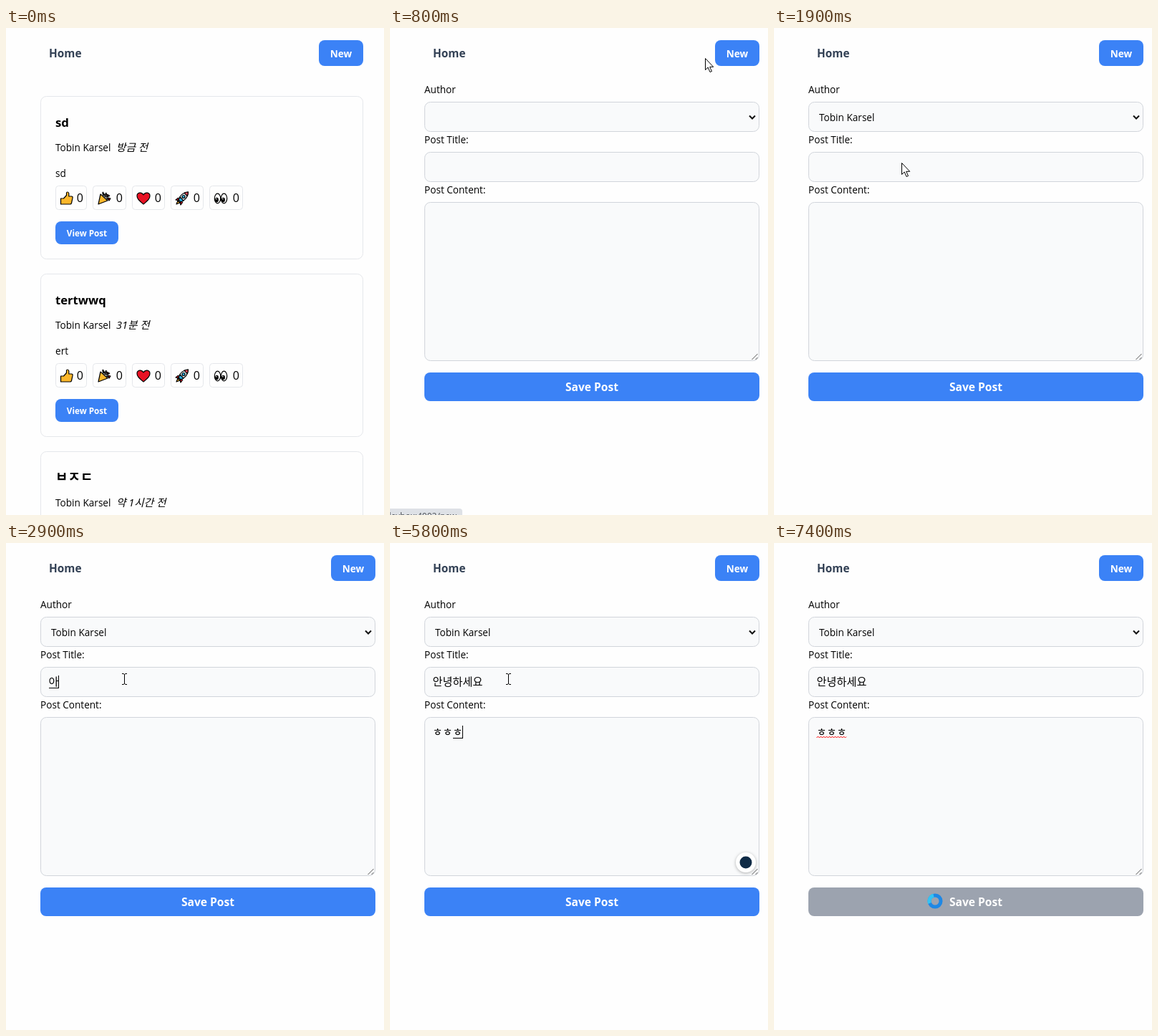
Write an HTML page that moves like this. It is 528x680 px and loops after 8 s.

```html
<!DOCTYPE html>
<html lang="ko">
<head>
<meta charset="utf-8">
<title>Post form</title>
<style>
  html, body { margin: 0; width: 100%; height: 100%; overflow: hidden; background: #fefefe; }
  svg { display: block; width: 528px; height: 680px; }
  text { font: 13.6px "Open Sans", "Noto Sans CJK KR", "Noto Sans CJK JP", sans-serif; white-space: pre; }
  .b { font-weight: 700; }
  .ko { font-size: 15.2px; }
  .date { font-size: 14.6px; font-style: italic; }
  .card { fill: #fefefe; stroke: #e5e7eb; }
  .field { fill: #f9fafb; stroke: #d1d5db; }
  .btn { fill: #3b82f6; }
  .ink { stroke: #000; stroke-width: 1.2; stroke-linejoin: round; }
  .menu { filter: drop-shadow(1px 2px 3px rgba(0,0,0,.3)); }
  .badge { filter: drop-shadow(0 1px 2px rgba(0,0,0,.3)); }
</style>
</head>
<body>
<svg id="stage" viewBox="0 0 528 680"></svg>
<script>
const stage = document.getElementById('stage');
const AUTHORS = ['', 'Louann Brodan', 'Tobin Karsel', 'Wilhelmina Brond'];
const BLUE = '#3b82f6', HOVER = '#2563eb', GRAY = '#9ca3af';

// Each track lists [start ms, value...]; a value holds until the next start.
const page = [[0, 'list'], [800, 'form']];
const newHover = [[0, 0], [300, 1], [800, 0]];
const status = [[0, 0], [500, .5], [600, 1], [1000, .5], [1100, 0]];
const menuRow = [[0, -1], [1200, 0], [1500, 1], [1800, 2], [1900, -1]];
const author = [[0, 0], [1900, 2]];
const title = [[0, ''], [2500, 'ㅇ'], [2900, '아'], [3000, '안'], [3100, '안ㄴ'], [3300, '안녀'],
  [3400, '안녕'], [3500, '안녕ㅎ'], [3600, '안녕하'], [3700, '안녕핫'], [3800, '안녕하세'],
  [3900, '안녕하셍'], [4100, '안녕하세요']];
const content = [[0, ''], [5500, 'ㅎ'], [5600, 'ㅎㅎ'], [5800, 'ㅎㅎㅎ']];
const focus = [[0, ''], [2100, 'title'], [4300, 'content'], [7000, '']];
const caretOn = [[0, 1], [4800, 0], [5200, 1], [6300, 0], [6800, 1]];
const badge = [[0, 0], [4500, .25], [4600, 1], [7300, .4], [7400, 0]];
const save = [[0, BLUE], [6800, HOVER], [7100, GRAY]];
const pointer = [[0, ''], [100, 'arrow', 479, 62], [200, 'arrow', 447, 64], [300, 'hand', 442, 43],
  [800, 'arrow', 440, 42], [900, 'arrow', 437, 50], [1000, 'arrow', 360, 69], [1100, 'arrow', 250, 115],
  [1200, 'arrow', 202, 136], [1400, 'arrow', 202, 147], [1500, 'arrow', 186, 181],
  [1800, 'arrow', 178, 188], [2000, 'beam', 165, 190], [6500, 'beam', 178, 262],
  [6600, 'beam', 200, 380], [6700, 'arrow', 214, 468], [6800, 'hand', 222, 501], [7100, 'busy', 225, 500]];

const step = (track, t) => track.findLast(k => k[0] <= t);
const at = (track, t) => step(track, t)[1];

const rect = (x, y, w, h, r, attrs) =>
  `<rect x="${x}" y="${y}" width="${w}" height="${h}" rx="${r}" ${attrs}/>`;
const text = (x, y, str, attrs = '') => `<text x="${x}" y="${y}" ${attrs}>${str}</text>`;
const bold = (x, y, str, size, fill, attrs = '') =>
  text(x, y, str, `class="b" style="font-size:${size}px" fill="${fill}" ${attrs}`);
const move = (x, y, body, attrs = '') => `<g transform="translate(${x} ${y})" ${attrs}>${body}</g>`;
const path = (d, fill, attrs = 'class="ink"') => `<path d="${d}" fill="${fill}" ${attrs}/>`;

const eye = x => `<ellipse cx="${x}" cy="10" rx="4.2" ry="6.8" fill="#fff" class="ink"/>
  <ellipse cx="${x - 1}" cy="12" rx="2.4" ry="3.2"/><circle cx="${x - 1.6}" cy="10.8" r=".8" fill="#fff"/>`;

const EMOJI = [
  path('M1.500 10h4l4-4.500v-3q0-1.500 1.500-1.500t1.800 2v4h3.700q2 0 1.500 2.500l-1.500 7q-.4 1.500-2 1.500h-13z', '#fcb72b'),
  path('M5 4l10 9L2 18z', '#fcb72b') +
    path('M8 1l2 4M13 2l-2 6M18 6l-6 2M18 12l-5-2', 'none', 'stroke="#222" stroke-width="2.200"') +
    path('M13 4l3 1-1 3zM15 9l4 1-2 3z', '#c62839') + path('M8 3l3 2-2 1z', '#168b74'),
  path('M10 18C3 12 1 10 1 6.500 1 2 7 0 10 5c3-5 9-3 9 1.500 0 3.500-2 5.500-9 11.500z', '#e81224'),
  path('M5 9l-4 3 4 1M11 15l-3 4-1-4', '#e81224') + path('M4 13l-2 5 5-2z', '#fcb72b') +
    path('M5 12Q8 2 18.500 1 18 11 8 15z', '#e6f1f5') + path('M13 2.300Q16 1 18.500 1q0 3-1.300 5.500z', '#f04a5a') +
    path('M5 12l2-4 5 5-4 2z', '#29aee3') + '<circle cx="12" cy="7.500" r="2" fill="#29aee3" class="ink"/>',
  eye(5.5) + eye(14.5)
];
const BOXES = [[69, 44], [121, 47], [176, 46], [230, 46], [284, 47]];

const POINTERS = {
  arrow: path('M.5.5v16l3.700-3.500 2.800 6.500 2.500-1-2.800-6.200h5z', '#fff', 'stroke="#000"'),
  hand: path('M-1.500 1.500v10l-2-2c-2-1-3 1-2 2l5 7v2.500h9v-3l2-5v-5c0-2-2.500-2-2.500-.5 0-2-3-2-3-.5 0-2-3-2-3-.5v-5c0-2-3.500-2-3.500 0z',
    '#fff', 'stroke="#000"'),
  beam: path('M-3-7.500h2l1.500 1 1.500-1h2M-3 7.500h2l1.500-1 1.500 1h2M.5-6.500v13', 'none', 'stroke="#000"'),
  busy: '<circle r="8" fill="none" stroke="#1e88e5" stroke-width="5"/>' +
    path('M-7.500 3A8 8 0 0 1-2-7.700', 'none', 'stroke="#35c3f3" stroke-width="5"')
};

function card(y, heading, size, date, body) {
  let out = rect(.5, .5, 450, 227, 8, 'class="card"') +
    bold(21, 43, heading, size, '#000') + text(21, 77, AUTHORS[2]) +
    text(106, 77, date, 'class="date"') + text(21, 113, body);
  BOXES.forEach(([x, w], i) => {
    x -= 48;
    out += rect(x + .5, 125.5, w - 1, 33, 4, 'class="card"') + move(x + 6, 133, EMOJI[i]) +
      text(x + w - 5, 148, 0, 'text-anchor="end" style="font-size:16px"');
  });
  out += rect(21, 175, 88, 32, 8, 'class="btn"') +
    bold(65, 195.5, 'View Post', 11.7, '#fff', 'text-anchor="middle"');
  return move(48, y, out);
}

const LIST = card(95, 'sd', 16.8, '방금 전', 'sd') +
  card(343, 'tertwwq', 16.6, '31분 전', 'ert') + card(591, 'ㅂㅈㄷ', 19, '약 1시간 전', '');

const FORM = text(48, 91, 'Author') + text(48, 161, 'Post Title:') + text(48, 231, 'Post Content:') +
  [[103, 41], [173, 41], [243, 221]].map(([y, h]) => rect(48.5, y + .5, 467, h, 8, 'class="field"')).join('') +
  path('M502 122.500l4 4 4-4', 'none', 'stroke="#111" stroke-width="2"') +
  path('M505.500 463l8-8M510.500 463l3-3', 'none', 'stroke="#555"');

const SQUIGGLE = path('M59.500 272' + 'l2-2 2 2'.repeat(10) + 'l1.500-1.500', 'none', 'stroke="#f00"');

// Typed Hangul with a caret; the last character is underlined while composing.
function typed(str, y, focused, composing, caret) {
  const end = 59.5 + 14 * str.length;
  let out = text(59.5, y, str, 'class="ko"');
  if (focused && composing && str) out += rect(end - 13.5, y + 3, 13, 1, 0, '');
  if (focused && caret) out += rect(Math.floor(end), y - 14, 1, 18, 0, '');
  return out;
}

function menu(row) {
  return rect(48.5, 145.5, 467, 76, 0, 'class="menu" fill="#f9fafb" stroke="#6b7280"') +
    rect(49, 146 + (row && 19 * row - 1), 466, row ? 19 : 18, 0, 'fill="#1967d2"') +
    AUTHORS.map((name, i) => text(63, 160 + 19 * i, name, i === row ? 'fill="#fff"' : '')).join('');
}

function form(t) {
  const active = at(focus, t), caret = at(caretOn, t), row = at(menuRow, t), glow = at(badge, t);
  let out = FORM + text(63, 130, AUTHORS[at(author, t)]) +
    typed(at(title, t), 199, active === 'title', true, caret) +
    typed(at(content, t), 269, active === 'content', true, caret);
  if (t >= 7000) out += SQUIGGLE;
  if (glow) out += `<g opacity="${glow}"><circle class="badge" cx="497" cy="446" r="14" fill="#fff"/>
    <circle cx="497" cy="446" r="8.500" fill="#0f2b46"/></g>`;
  out += rect(48, 481, 468, 40, 8, `fill="${at(save, t)}"`) +
    bold(282, 507, 'Save Post', 15.6, '#fff', 'text-anchor="middle"');
  return row < 0 ? out : out + menu(row);
}

function draw(t) {
  const onForm = at(page, t) === 'form', shift = onForm ? 17 : 0;
  const [, kind, x, y] = step(pointer, t), bar = at(status, t);
  let out = bold(60, 41, 'Home', 15.4, '#334155') +
    rect(437 + shift, 17, 62, 36, 8, `fill="${at(newHover, t) ? HOVER : BLUE}"`) +
    bold(468 + shift, 41, 'New', 13.6, '#fff', 'text-anchor="middle"') +
    (onForm ? form(t) : LIST);
  if (bar) out += `<g opacity="${bar}">` + rect(-8, 671, 109, 20, 4, 'fill="#dee1e6"') +
    text(93, 686, 'devbox:4002/new', 'text-anchor="end" fill="#4b4f54" style="font-size:12px"') + '</g>';
  if (kind) out += move(x, y, POINTERS[kind]);
  return out;
}

let shown = -1;
function tick() {
  const t = Math.floor(performance.now() % 8000 / 100) * 100;
  if (t !== shown) stage.innerHTML = draw(shown = t);
  requestAnimationFrame(tick);
}
tick();
</script>
</body>
</html>
```
